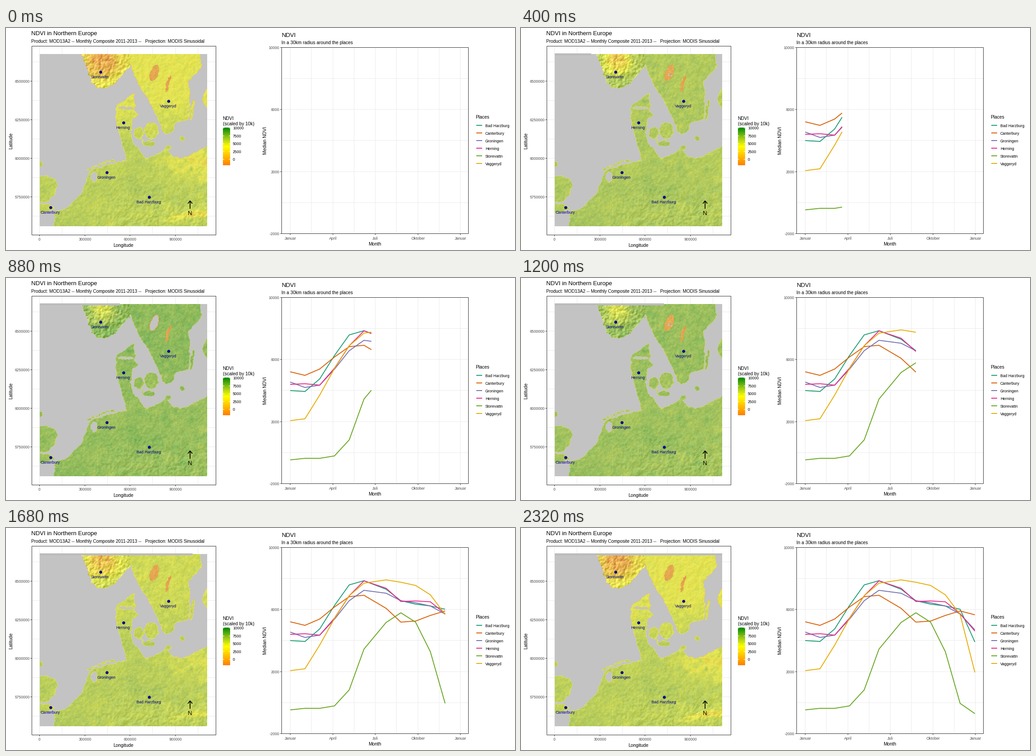
A matplotlib script for the animation above (2400 ms loop, 1131x495 px).

```python
import numpy as np
import matplotlib.pyplot as plt
from matplotlib.animation import FuncAnimation
from matplotlib.patches import Rectangle
from matplotlib.path import Path

STAGE_W, STAGE_H, DPI = 1131, 495, 72   # at 72 dpi one point is one pixel
FRAMES, LAST = 30, 23                   # the year is complete at LAST, then rests
LEFT, TOP, RIGHT, BOTTOM = 75, 58, 447, 442
W, H = RIGHT - LEFT, BOTTOM - TOP
SEA, ALPHA = 195, 0.58

plt.rcParams["font.family"] = "Liberation Sans"
rng = np.random.default_rng(11)


def noise(step):
    """Smooth random field with bumps about `step` pixels wide."""
    g = rng.normal(size=(H // step + 2, W // step + 2))
    y, x = np.arange(H) / step, np.arange(W) / step
    i, j = y.astype(int), x.astype(int)
    fy, fx = (y - i)[:, None], x - j
    rows = g[i] * (1 - fy) + g[i + 1] * fy
    return rows[:, j] * (1 - fx) + rows[:, j + 1] * fx


def blur(mask):
    p = np.pad(mask.astype(float), 1, mode="edge")
    return sum(p[a:a + H, b:b + W] for a in range(3) for b in range(3)) / 9


# ---- land: rough outlines, frayed by noise ----
Y, X = np.mgrid[TOP:BOTTOM, LEFT:RIGHT] + 0.5
rough_x = X + 0.9 * noise(3) + 1.3 * noise(8)
rough_y = Y + 0.9 * noise(3) + 1.3 * noise(8)
rough = np.column_stack([rough_x.ravel(), rough_y.ravel()])


def inside(*corners):
    return Path(corners).contains_points(rough).reshape(H, W)


def ellipse(cx, cy, rx, ry, lean=0):
    dy = rough_y - cy
    return ((rough_x - cx + lean * dy) / rx) ** 2 + (dy / ry) ** 2 < 1


scandinavia = inside(
    (166, 48), (172, 68), (181, 95), (188, 117), (202, 131), (220, 136),
    (240, 127), (256, 107), (272, 90), (276, 78), (278, 90), (288, 113),
    (311, 152), (324, 178), (338, 203), (348, 231), (358, 238), (373, 230),
    (376, 212), (405, 206), (409, 180), (406, 118), (421, 104), (434, 88),
    (430, 48))
jutland = inside(
    (286, 144), (285, 161), (288, 172), (283, 184), (295, 193), (281, 206),
    (278, 235), (285, 260), (298, 272), (300, 310), (266, 310), (265, 285),
    (255, 248), (246, 222), (243, 190), (247, 170), (265, 162), (273, 153))
continent = inside(
    (296, 276), (312, 291), (335, 282), (353, 269), (372, 286), (388, 291),
    (420, 277), (460, 256), (460, 455), (104, 455), (110, 410), (136, 401),
    (165, 372), (180, 342), (183, 322), (197, 313), (235, 304), (252, 296),
    (270, 297))
england = inside((60, 330), (92, 330), (108, 336), (115, 352), (110, 372),
                 (92, 387), (60, 386))
land = scandinavia | jutland | continent | england
land |= ellipse(70, 401, 37, 11) | ellipse(72, 304, 10, 7)              # England
land |= ellipse(295, 234, 11, 13) | ellipse(323, 228, 15, 19)           # Denmark
land |= ellipse(318, 258, 13, 6) | ellipse(303, 252, 2, 7)
land |= ellipse(392, 245, 7, 5) | ellipse(360, 267, 7, 6)               # Baltic
land |= ellipse(448, 157, 10, 21) | ellipse(414, 182, 4, 24, 0.13)
for t in np.linspace(0, 1, 7):                                          # Frisia
    land |= ellipse(184 + 52 * t, 316 - 20 * t ** 0.7, 5, 1.7)
land &= ~(ellipse(196, 331, 6, 12) | ellipse(268, 178, 16, 3))          # inlets
vanern, vattern = ellipse(329, 101, 10, 17, 0.3), ellipse(360, 124, 4, 18, 0.2)
lakes = vanern | vattern
core = vanern & (blur(vanern) > 0.9)
shore = np.clip(1 - blur(land), 0, 0.6)

# ---- relief and vegetation patterns ----
norway = np.exp(-((X - 213) / 38) ** 2 - ((Y - 72) / 36) ** 2)
south = np.clip((Y - 345) / 60, 0, 1) * np.clip((X - 190) / 80, 0, 1)
elev = 2 * noise(11) + 1.6 * noise(5) + 0.8 * noise(3)
gy, gx = np.gradient(elev)
slope = (gx + gy) / (gx + gy).std()
relief = np.where((X < 277) & (Y < 140), 42, 9 + 11 * south)
hill = SEA + relief * np.clip(slope, -2.2, 1.5)

north = np.clip((265 - Y) / 110, 0, 1)
poland = np.clip((X - 320) / 90, 0, 1) * np.exp(-((Y - 298) / 34) ** 2)
ridge = np.clip((X - 335) / 60, 0, 1) * np.exp(
    -((Y - 421 + 0.22 * (X - 390) + 4 * noise(14)) / 8) ** 2)
cold = poland * (0.8 + 0.4 * noise(6)) + ridge * (1 + 0.4 * noise(5))
rugged = 1 + 0.22 * noise(4) + 0.15 * noise(9)
grain = 250 * noise(20) + 250 * noise(7) + 260 * noise(3) + 260 * noise(1)
patch = 0.5 + 0.25 * noise(4)
seam = (X == 203.5) & (Y > 350) & (Y < 432) & (rng.random((H, W)) < 0.6)

STOPS = np.linspace(-2000, 10000, 5)
COLORS = np.array([(255, 127, 0), (255, 193, 0), (255, 255, 0),
                   (146, 196, 25), (0, 139, 0)])


def colormap(v):
    return np.stack([np.interp(v, STOPS, c) for c in COLORS.T], axis=-1)


def ndvi_map(step):
    u = step / LAST
    summer = np.sin(np.pi * u)
    plains = 5950 + 1550 * summer ** 2
    forests = 4000 + 3800 * summer
    snow = 4700 + 1400 * np.cos(2 * np.pi * (u - 0.1))
    thaw = 1.3 - ((step - 10) / 5) ** 2
    v = plains + (forests - plains) * north + grain
    v = v - snow * rugged * norway ** (1 + 1.5 * summer)
    v = v - 2800 * (1 - summer) ** 2 * cold - 4500 * shore - 1400 * seam
    v = np.where(lakes, -1200 + grain, v)
    rgb = ALPHA * colormap(v) + (1 - ALPHA) * hill[..., None]
    rgb[~land | (core & (patch < thaw))] = SEA
    return np.clip(rgb, 0, 255).astype(np.uint8)


# ---- stage ----
fig = plt.figure(figsize=(STAGE_W / DPI, STAGE_H / DPI), dpi=DPI, facecolor="white")
ax = fig.add_axes([0, 0, 1, 1])
ax.axis("off")


def label(x, y, s, size, color="black", ha="left"):
    """Text whose capitals are centred on y."""
    ax.text(x, y + 0.36 * size, s, size=size, color=color, ha=ha,
            va="baseline", zorder=6)


def upright(x, y, s):
    ax.text(x, y, s, size=10.4, ha="center", va="center", rotation=90)


def line(x, y, color, width=1, z=3):
    return ax.plot(x, y, color=color, lw=width, zorder=z, snap=False,
                   solid_capstyle="butt", solid_joinstyle="round")[0]


def box(x0, y0, x1, y1, **style):
    return ax.add_patch(Rectangle((x0, y0), x1 - x0, y1 - y0, snap=False, **style))


def panel(x0, y0, x1, y1, xticks, xlabels, yticks, ylabels, label_y):
    """Frame with ticks; a minor grid line lies half way between two ticks."""
    def grid(ticks, lo, hi):
        gap = ticks[1] - ticks[0]
        lines = np.arange(ticks[0] - gap / 2, hi, gap / 2)
        return [np.floor(v) + 0.5 for v in lines if lo < v < hi]

    for x in grid(xticks, x0, x1):
        line([x, x], [y0, y1], "#ebebeb", z=0)
    for y in grid(yticks, y0, y1):
        line([x0, x1], [y, y], "#ebebeb", z=0)
    for x, s in zip(np.floor(xticks) + 0.5, xlabels):
        line([x, x], [y1, y1 + 3], "#333333")
        label(x, label_y, s, 8.5, "#4d4d4d", "center")
    for y, s in zip(np.floor(yticks) + 0.5, ylabels):
        line([x0 - 3, x0], [y, y], "#333333")
        label(x0 - 5, y, s, 8.5, "#4d4d4d", "right")
    box(x0, y0, x1, y1, fill=False, ec="#333333", lw=1, zorder=4)


# map panel
panel(57.5, 40.5, 466.5, 461.5,
      74.5 + 100.5 * np.arange(4), range(0, 900001, 300000),
      118.5 + 86 * np.arange(4), range(6500000, 5749999, -250000), 470.5)
label(56.5, 11.5, "NDVI in Northern Europe", 13.1)
label(56.5, 29.5, "Product: MOD13A2 -- Monthly Composite 2011-2013 --   "
      "Projection: MODIS Sinusoidal", 10.05)
label(261, 484, "Longitude", 10.2, ha="center")
upright(11, 251, "Latitude")

raster = ax.imshow(ndvi_map(0), extent=(LEFT, RIGHT, BOTTOM, TOP), aspect="auto",
                   interpolation="nearest", zorder=1)
progress = box(LEFT, 56.5, LEFT, 61, fc="#bbbbbb", lw=0, zorder=2)

PLACES = [("Storevattn", 209.5, 97.5), ("Vaggeryd", 360.5, 162.5),
          ("Herning", 260.5, 210.5), ("Groningen", 223.5, 321.5),
          ("Bad Harzburg", 318, 376.5), ("Canterbury", 99, 399.5)]
for name, x, y in PLACES:
    ax.plot(x, y, "o", ms=6.6, color="#00008b", mew=0, zorder=5)
    label(x - 0.5, y + 11.8, name, 8.8, "#00008b", "center")

line([409, 409], [403, 385.5], "black", 1.7, 5)
line([404, 409, 414], [391.5, 385.5, 391.5], "black", 1.7, 5)
label(409, 412.5, "N", 13, ha="center")

# colour bar
label(481.5, 201, "NDVI", 10.2)
label(481.5, 213, "(scaled by 10k)", 10.2)
ramp = colormap(np.linspace(10000, -2000, 84))[:, None].astype(np.uint8)
ax.imshow(ramp, extent=(482, 498, 306.5, 222.5), aspect="auto", zorder=1)
for k in range(5):
    y = 223 + 17.5 * k
    line([482, 485], [y, y], "white")
    line([495, 498], [y, y], "white")
    label(504, y + 0.3, str(10000 - 2500 * k), 8.6)

# chart panel
panel(612.5, 43.5, 1027.5, 458.5,
      631.5 + 94.6 * np.arange(5), ["Januar", "April", "Juli", "Oktober", "Januar"],
      43.5 + 138.33 * np.arange(4), range(10000, -2001, -4000), 468.5)
label(612.5, 15.5, "NDVI", 13.1)
label(612.5, 32.5, "In a 30km radius around the places", 10.1)
label(819.5, 481.5, "Month", 10.2, ha="center")
upright(576, 251, "Median NDVI")

# medians in hundreds at the turning months; the others follow smoothly
TURNS = [0, 1, 2, 4, 5, 7, 9, 10, 11]
SERIES = [
    ("Bad Harzburg", "#1b9e77", [40, 39.4, 47.5, 75.9, 78.6, 65.7, 62.3, 60.2, 39.1]),
    ("Canterbury", "#d95f02", [52.1, 49.8, 53.9, 68.3, 69.2, 51.9, 56.2, 59.1, 56.6]),
    ("Groningen", "#7570b3", [45.5, 42, 43.5, 65.7, 72.4, 65.7, 62.3, 57.1, 46.9]),
    ("Herning", "#e7298a", [44, 44.4, 43.5, 68.9, 78.5, 65.2, 65, 57.3, 46.1]),
    ("Storevattn", "#66a61e", [-4.7, -3.7, -3.7, 8.2, 34.5, 57.9, 32.8, -0.5, -7.1]),
    ("Vaggeryd", "#e6ab02", [20.6, 21.8, 37.1, 68.9, 77, 77.6, 69.5, 56.8, 19.5]),
]


def hermite(x, xk, yk):
    """Smooth curve through the knots."""
    xk, yk = np.array(xk, float), np.array(yk, float)
    m = np.gradient(yk, xk)
    i = np.clip(np.searchsorted(xk, x, side="right") - 1, 0, len(xk) - 2)
    h = xk[i + 1] - xk[i]
    t = (x - xk[i]) / h
    ease = t * t * (3 - 2 * t)
    return (yk[i] + (yk[i + 1] - yk[i]) * ease
            + h * t * (1 - t) * (m[i] * (1 - t) - m[i + 1] * t))


months = np.arange(12)
steps = np.arange(LAST + 1)
month_steps = np.round(months * LAST / 11)
xs = np.linspace(631.5, 1008.5, LAST + 1)
curves = []
label(1043.5, 198.5, "Places", 10.2)
for k, (name, color, medians) in enumerate(SERIES):
    heights = 43.5 + 3.458 * (100 - hermite(months, TURNS, medians))
    curves.append((line([], [], color, 1.9), np.interp(steps, month_steps, heights)))
    y = 217 + 17 * k
    line([1045, 1058], [y, y], color, 2)
    label(1065, y + 0.5, name, 8.6)

ax.set_xlim(0, STAGE_W)
ax.set_ylim(STAGE_H, 0)


def draw(i):
    step = min(i, LAST)
    raster.set_data(ndvi_map(step))
    progress.set_width(W * step / LAST)
    for curve, ys in curves:
        curve.set_data(xs[:step + 1], ys[:step + 1])
    return [raster, progress] + [c for c, _ in curves]


anim = FuncAnimation(fig, draw, frames=FRAMES, interval=80, repeat=True)
plt.show()
```
